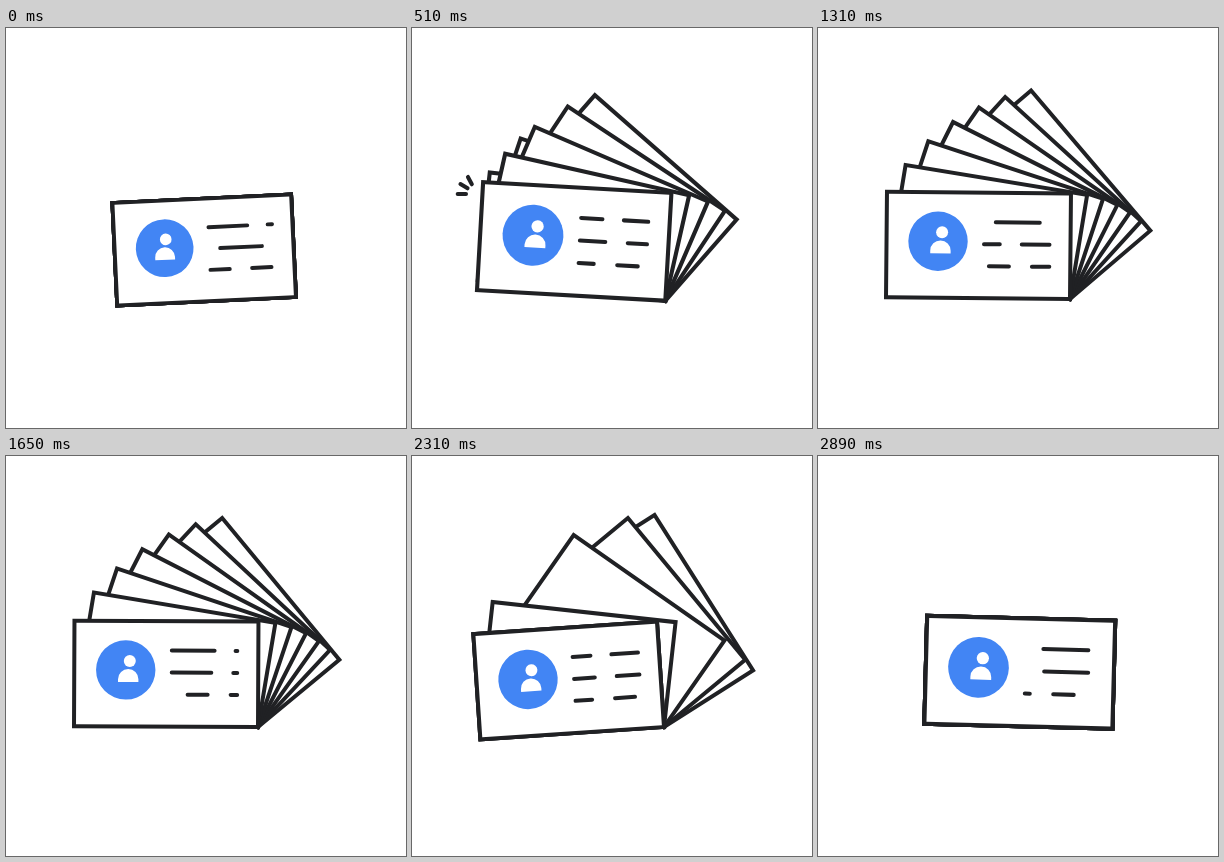
Write an HTML page with a canvas that moves like this. It is 400 px wide and 400 px high and loops after 2930 ms.

```html
<!DOCTYPE html>
<html>
<head>
<meta charset="utf-8">
<style>
  html, body { margin: 0; width: 400px; height: 400px; overflow: hidden; background: #fff; }
  canvas { display: block; }
</style>
</head>
<body>
<canvas width="400" height="400"></canvas>
<script>
const ctx = document.querySelector('canvas').getContext('2d');
const LOOP = 2930, CARDS = 6, INK = '#202124', BLUE = '#4285f4', W = 184, H = 105.5;

const rad = deg => deg * Math.PI / 180;
const mix = (a, b, u) => a + (b - a) * u;

// Progress from 0 to 1 over a span of time, plain or eased at both ends
const progress = (t, start, span) => Math.max(0, Math.min(1, (t - start) / span));
const ease = (t, start, span) => {
  const u = progress(t, start, span);
  return u * u * (3 - 2 * u);
};

// Eased value at time t between [time, value] key points
function track(t, ...keys) {
  return keys.reduce(([t0, a], [t1, b]) => [t1, mix(a, b, ease(t, t0, t1 - t0))])[1];
}

const zoom = t => track(t, [0, .972], [500, 1.025], [1300, 1], [2700, 1], [2890, 1.022]);
const frontTilt = t => track(t, [0, -2.7], [140, -8.5], [380, 3.5], [1100, .6], [2100, 0], [2660, -12], [2890, 1.5]);

// Cards behind swing up one by one, bounce, then drop one by one
function fanTilt(i, t, front) {
  const rest = 9.6 * i - .2 * i * i, bounce = 8;
  const rise = 111 + 55 * i, swing = 183, fall = 1650 + 90 * i;
  if (t < rise + swing) return mix(front, rest + bounce, progress(t, rise, swing) ** 3);
  const age = t - rise - swing;
  const wobble = bounce * Math.exp(-age / 300) * Math.cos(age / 210);
  const lift = bounce * ease(t, fall, 150);
  const drop = progress(t, fall + 150, 290) ** 3;
  return Math.max(front, mix(rest + wobble + lift, -15, drop));
}

function line(x0, y0, x1, y1) {
  ctx.beginPath();
  ctx.moveTo(x0, y0);
  ctx.lineTo(x1, y1);
  ctx.stroke();
}

function disc(x, y, r, color) {
  ctx.fillStyle = color;
  ctx.beginPath();
  ctx.arc(x, y, r, 0, 7);
  ctx.fill();
}

// Dashes sliding through a fixed window
function dashes(y, start, length, gap) {
  const left = -86.5, right = -21, period = length + gap;
  const phase = ((start - left) % period + period) % period;
  for (let x = left + phase - period; x < right; x += period) {
    const a = Math.max(x, left), b = Math.min(x + length, right);
    if (b > a) line(a, y, b, y);
  }
}

function face(t) {
  disc(-132.5, -56.5, 29.7, BLUE);
  const x = -130 - 2.5 * (1 - ease(t, 0, 300));
  disc(x + 1.5, -65.5, 6, '#fff');
  ctx.beginPath();
  ctx.arc(x, -47.2, 10.2, Math.PI, 0);
  ctx.lineTo(x + 10.2, -44.5);
  ctx.lineTo(x - 10.2, -44.5);
  ctx.fill();
  dashes(-76, -25.5 - .0377 * t, 44, 21);
  dashes(-54, -75.5 + .07 * t, 43, 22);
  dashes(-32, -43.5 - .0945 * t, 20, 23);
}

// A card turns about its lower right corner
function card(tilt, drawFace) {
  ctx.save();
  ctx.rotate(rad(tilt));
  ctx.fillStyle = '#fff';
  ctx.fillRect(-W, -H, W, H);
  ctx.strokeRect(-W, -H, W, H);
  if (drawFace) drawFace();
  ctx.restore();
}

function deck(t) {
  const front = frontTilt(t), s = zoom(t);
  const centred = 1 - ease(t, 0, 380) + ease(t, 2660, 240);
  ctx.save();
  ctx.translate(200, 200);
  ctx.scale(s, s);
  ctx.translate(52 + 40.5 * centred, 71);
  for (let i = CARDS; i > 0; i--) card(fanTilt(i, t, front));
  card(front, () => face(t));
  ctx.restore();
}

// Three short rays that grow outwards, then vanish outwards
function burst(t, start, x, y, angle) {
  const from = mix(11, 19.5, ease(t, start + 100, 100));
  const to = mix(11, 19.5, ease(t, start, 100));
  if (from === to) return;
  for (const turn of [-31, 0, 31]) {
    const c = Math.cos(rad(angle + turn)), s = Math.sin(rad(angle + turn));
    line(x + from * c, y + from * s, x + to * c, y + to * s);
  }
}

function draw(now) {
  const t = now % LOOP;
  ctx.fillStyle = '#fff';
  ctx.fillRect(0, 0, 400, 400);
  ctx.strokeStyle = INK;
  ctx.lineWidth = 4;
  ctx.lineCap = 'round';
  deck(t);
  burst(t, 420, 65, 166, 211);
  burst(t, 765, 338, 212.5, 40);
  requestAnimationFrame(draw);
}
requestAnimationFrame(draw);
</script>
</body>
</html>
```
